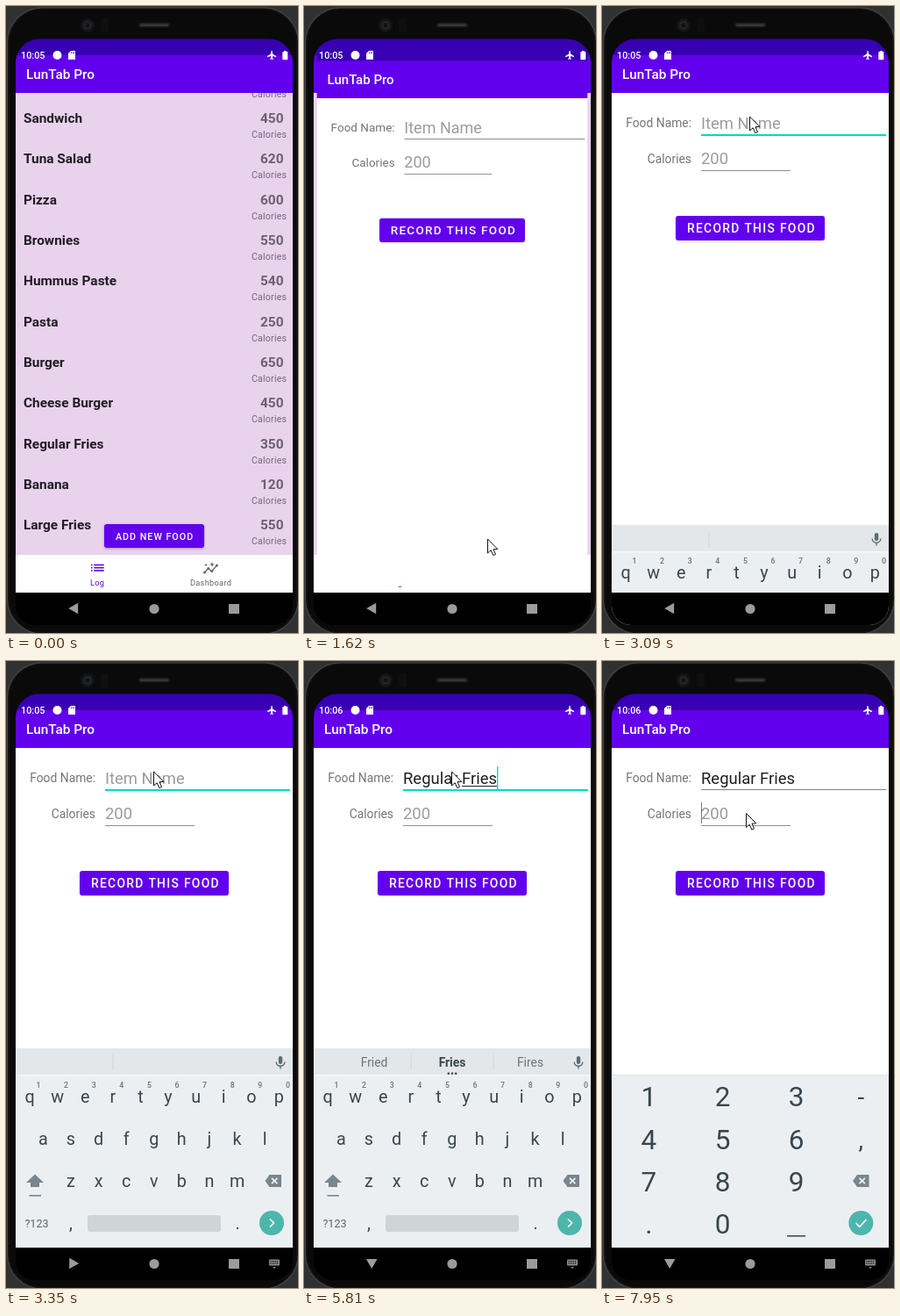
An HTML page with a canvas that plays this animation: 333 by 714 pixels, repeating every 8 s.

```html
<!DOCTYPE html>
<html lang="en">
<head>
<meta charset="utf-8">
<title>Food log</title>
<style>
html, body { margin: 0; width: 100%; height: 100%; overflow: hidden; background: #303133; }
canvas { display: block; width: 333px; height: 714px; }
</style>
</head>
<body>
<canvas id="stage"></canvas>
<script>
const W = 333, H = 714, LOOP = 8000;
const canvas = document.getElementById('stage');
const ctx = canvas.getContext('2d');
const dpr = window.devicePixelRatio || 1;
canvas.width = W * dpr;
canvas.height = H * dpr;

const PURPLE = '#6200ee', TEAL = '#03dac5', KEY = '#37474f', NAV = '#9b9b9b';
const FOODS = [['', ''], ['Sandwich', 450], ['Tuna Salad', 620], ['Pizza', 600], ['Brownies', 550],
  ['Hummus Paste', 540], ['Pasta', 250], ['Burger', 650], ['Cheese Burger', 450],
  ['Regular Fries', 350], ['Banana', 120], ['Large Fries', 550]];

// [time, typed text, suggestions]
const TYPING = [
  [4020, 'R', 'Really|R|Right'],
  [4160, 'Re', 'Really|Re|Red'],
  [4240, 'Reg', 'Regret|Reg|Register'],
  [4330, 'Regu', 'Regularly|Regular|Regulars'],
  [4410, 'Regul', 'Regularly|Regular|Regulars'],
  [4500, 'Regula', 'Regularly|Regular|Regulars'],
  [4580, 'Regular', 'Regularly|Regular|Regulars'],
  [4680, 'Regular ', 'Regularly|Regular|Regulars'],
  [4960, 'Regular F', 'For|F|From'],
  [5090, 'Regular Fr', 'From|Fr|Friday'],
  [5240, 'Regular Fri', 'Friday|Fri|Fries'],
  [5470, 'Regular Frie', 'Friend|Fries|Friends'],
  [5680, 'Regular Fries', 'Fried|Fries|Fires']
];

// [start, end, from x, from y, to x, to y]
const MOVES = [
  [260, 790, 259, 662, 209.5, 607],
  [1750, 2280, 209.5, 607, 207.5, 293],
  [2420, 2780, 207.5, 293, 168.5, 126],
  [6410, 6720, 168.5, 126, 164.5, 173.5]
];
const CLICKS = [[930, 1130], [2780, 2950], [6740, 6880]];
const CARETS = [[3380, 3880], [4020, 6010], [6470, 6740]];

const clamp = v => Math.max(0, Math.min(1, v));
const span = (t, a, b) => clamp((t - a) / (b - a));
const smooth = p => p * p * (3 - 2 * p);
const easeOut = p => 1 - (1 - p) ** 3;
const within = (t, list) => list.some(([a, b]) => t >= a && t < b);

function rect(x, y, w, h, color) {
  ctx.fillStyle = color;
  ctx.fillRect(x, y, w, h);
}

function round(x, y, w, h, r, color) {
  ctx.fillStyle = color;
  ctx.beginPath();
  ctx.roundRect(x, y, w, h, r);
  ctx.fill();
}

function disc(x, y, r, color) {
  ctx.fillStyle = color;
  ctx.beginPath();
  ctx.arc(x, y, r, 0, Math.PI * 2);
  ctx.fill();
}

function trace(points, closed) {
  ctx.beginPath();
  for (let i = 0; i < points.length; i += 2) ctx.lineTo(points[i], points[i + 1]);
  if (closed) ctx.closePath();
}

function poly(points, color) {
  ctx.fillStyle = color;
  trace(points, true);
  ctx.fill();
}

function line(points, color, width = 1) {
  ctx.strokeStyle = color;
  ctx.lineWidth = width;
  trace(points);
  ctx.stroke();
}

function text(str, x, y, size, color, { weight = 400, align = 'left', gap = 0 } = {}) {
  ctx.font = `${weight} ${size}px Roboto, sans-serif`;
  ctx.letterSpacing = `${gap}px`;
  ctx.textAlign = align;
  ctx.fillStyle = color;
  ctx.fillText(str, x, y);
  const width = ctx.measureText(str).width;
  ctx.letterSpacing = '0px';
  return width;
}

function button(x, y, w, h, shade) {
  ctx.save();
  ctx.shadowColor = `rgba(0,0,0,${shade})`;
  ctx.shadowBlur = 3 * dpr;
  ctx.shadowOffsetY = dpr;
  round(x, y, w, h, 3, PURPLE);
  ctx.restore();
}

function drawBody() {
  rect(0, 0, W, H, '#303133');
  round(1, 1.5, 333, 714, 40, '#48494b');
  round(2, 2.5, 331, 712, 39, '#131314');
  round(4, 4, 327, 709, 37, '#0a0a0b');
  disc(93, 22, 8, '#141517');
  disc(93, 22, 5, '#222428');
  disc(93, 22, 2.5, '#101215');
  round(108, 14, 9, 16, 2, '#0e0f10');
  round(151, 19, 36, 5.5, 2.7, '#1c1d1e');
  round(153, 20.5, 32, 2.5, 1.2, '#353637');
}

function drawHeader() {
  rect(11, 37, 316, 18.5, '#3700b3');
  rect(11, 55.5, 316, 43.5, PURPLE);
  text('LunTab Pro', 23, 83, 15.4, '#fff', { weight: 500 });
}

function drawStatus(t) {
  text(t < 5800 ? '10:05' : '10:06', 17, 60, 10.8, '#fff', { weight: 500 });
  disc(58.5, 56, 5, '#fff');
  poly([74, 51, 79, 51, 79, 61, 71, 61, 71, 54], '#fff');
  for (const x of [74, 75.8, 77.4]) rect(x, 52.3, 0.8, 2, PURPLE);
  poly([302.5, 51, 303.5, 51, 304, 54.5, 308, 57, 308, 58.2, 304, 57, 304, 59.5, 305, 60.5,
    305, 61, 303, 60.5, 301, 61, 301, 60.5, 302, 59.5, 302, 57, 298, 58.2, 298, 57, 302, 54.5], '#fff');
  rect(317, 51, 2.5, 1.5, '#fff');
  round(315.3, 52, 6, 9.2, 0.8, '#fff');
}

function drawList(t) {
  rect(11, 99, 316, 526, '#e8d2ec');
  ctx.save();
  ctx.beginPath();
  ctx.rect(11, 99, 316, 526);
  ctx.clip();
  FOODS.forEach(([name, kcal], i) => {
    const y = 86.6 + i * 46.35;
    text(name, 20, y, 15.4, '#211d22', { weight: 700 });
    text(kcal, 290, y, 15.4, '#6b616d', { weight: 700 });
    text('Calories', 280, y + 17, 10.5, '#736876', { gap: 0.25 });
  });
  ctx.restore();

  button(112, 590, 114, 27, 0.3);
  const ripple = span(t, 940, 1280);
  if (ripple > 0) {
    ctx.save();
    ctx.beginPath();
    ctx.roundRect(112, 590, 114, 27, 3);
    ctx.clip();
    disc(209, 607, 8 + 100 * easeOut(ripple), 'rgba(255,255,255,.12)');
    ctx.restore();
  }
  text('ADD NEW FOOD', 125, 607.5, 10.77, '#fff', { weight: 500, gap: 0.96 });

  rect(11, 625, 316, 43, '#fff');
  for (let i = 0; i < 3; i++) {
    const y = 635.7 + i * 3.2;
    rect(97, y, 1.6, 1.6, PURPLE);
    rect(100.2, y, 11.5, 1.6, PURPLE);
  }
  text('Log', 104.2, 660.3, 9.23, PURPLE, { align: 'center', gap: 0.3 });
  const grey = '#666';
  const dots = [226.5, 645, 230.8, 640.5, 234.8, 643.5, 240.5, 637];
  line(dots, grey, 1.3);
  for (let i = 0; i < 8; i += 2) disc(dots[i], dots[i + 1], 1.5, grey);
  poly([235, 633, 235.8, 635.2, 238, 636, 235.8, 636.8, 235, 639, 234.2, 636.8, 232, 636, 234.2, 635.2], grey);
  poly([228, 634.5, 228.5, 636, 230, 636.5, 228.5, 637, 228, 638.5, 227.5, 637, 226, 636.5, 227.5, 636], grey);
  text('Dashboard', 233.6, 660.3, 9.23, grey, { align: 'center', gap: 0.3 });
}

function drawForm(t) {
  rect(11, 99, 316, 569, '#fff');
  const label = '#757575', hint = '#9c9c9c', size = 18.46;
  const focused = t >= 2880 && t < 6930;
  text('Food Name:', 102, 138, 13.85, label, { align: 'right' });
  text('Calories', 102, 178.7, 13.85, label, { align: 'right' });

  const step = TYPING.filter(s => t >= s[0]).pop();
  let end = 113;
  if (step) {
    end += text(step[1], 113, 140, size, '#202020');
    const start = step[1].lastIndexOf(' ') + 1;
    if (focused && start < step[1].length) {
      const from = 113 + ctx.measureText(step[1].slice(0, start)).width;
      rect(from, 142, end - from, 1, '#202020');
    }
  } else {
    text('Item Name', 113, 140, size, hint);
  }
  text('200', 113, 180, size, hint);
  if (focused) rect(113, 146, 211, 2, TEAL);
  else rect(113, 146, 211, 1, '#858585');
  rect(113, 187, 102, 1, '#909090');

  if (focused && within(t, CARETS)) rect(Math.round(end), 120, 1.4, 26, TEAL);
  if (!focused && within(t, [[7000, 7470], [7950, 8000]])) rect(113, 161, 1, 24, '#777');

  button(84, 239, 170, 28, 0.12);
  text('RECORD THIS FOOD', 97, 258.2, 13.85, '#fff', { weight: 500, gap: 1.31 });
  return step;
}

function backspace(x, y) {
  poly([x - 9.5, y, x - 4.5, y - 7, x + 9, y - 7, x + 9, y + 7, x - 4.5, y + 7], '#78868d');
  line([x - 2, y - 3.2, x + 4.4, y + 3.2], '#eceff1', 1.7);
  line([x - 2, y + 3.2, x + 4.4, y - 3.2], '#eceff1', 1.7);
}

function mic(x, y) {
  const c = '#5b6b74';
  round(x - 2.2, y - 7, 4.4, 9, 2.2, c);
  ctx.strokeStyle = c;
  ctx.lineWidth = 1.4;
  ctx.beginPath();
  ctx.arc(x, y - 0.5, 4.8, 0, Math.PI);
  ctx.stroke();
  line([x, y + 4, x, y + 7.5], c, 1.4);
}

function drawLetters(words) {
  rect(11, 441, 316, 227, '#eceff1');
  rect(11, 441, 316, 30, '#e3e7ea');
  rect(11, 471, 316, 1.5, '#f6f8f9');
  rect(121.5, 448, 1, 18, '#cfd5d9');
  if (words) {
    rect(215.5, 448, 1, 18, '#cfd5d9');
    words.split('|').forEach((word, i) => {
      const mid = i === 1;
      text(word, 80 + 89 * i, 462.3, 13.85, mid ? KEY : '#66757d', { weight: mid ? 700 : 400, align: 'center' });
    });
    for (const x of [164.8, 169, 173.2]) disc(x, 469.8, 1.3, KEY);
  }
  mic(313, 457);

  const center = { align: 'center' };
  const rows = [['qwertyuiop', 27, 502.5], ['asdfghjkl', 42.3, 550.8], ['zxcvbnm', 74, 599]];
  for (const [keys, x, y] of rows) {
    [...keys].forEach((key, i) => text(key, x + i * 31.6, y, 19.8, KEY, center));
  }
  for (let i = 0; i < 10; i++) {
    text((i + 1) % 10, 37 + i * 31.6, 485.5, 8.8, '#66757d', { align: 'center', weight: 500 });
  }
  poly([33, 584.5, 43, 594, 38, 594, 38, 599, 28, 599, 28, 594, 23, 594], '#78868d');
  rect(26.5, 608, 13.5, 1.6, '#78868d');
  backspace(305, 592);

  text('?123', 35, 645, 12.6, '#56666e', center);
  text(',', 74, 647, 19.8, KEY, center);
  round(93, 631, 152, 19, 3, '#cfd4d7');
  text('.', 264, 647, 19.8, KEY, center);
  disc(303, 640, 14, '#4db6ac');
  line([301, 635.5, 305.5, 640, 301, 644.5], '#fff', 1.7);
}

function drawDigits() {
  rect(11, 471, 316, 197, '#eceff1');
  rect(11, 471, 316, 1, '#e0e5e8');
  const columns = [53.3, 137.7, 221.7];
  ['123', '456', '789', '.0_'].forEach((keys, row) => {
    [...keys].forEach((key, i) => {
      if (key === '_') rect(211, 654, 21, 1.5, KEY);
      else text(key, columns[i], 507.3 + row * 48.2, 31.5, KEY, { align: 'center' });
    });
  });
  text('-', 295.3, 506, 28, KEY, { align: 'center' });
  text(',', 295.3, 555, 28, KEY, { align: 'center' });
  backspace(295.5, 592);
  disc(295.3, 640, 14, '#4db6ac');
  line([289.5, 640, 293.8, 644.3, 301.5, 636], '#fff', 1.7);
}

function drawNav(t) {
  rect(11, 668, 316, 37, '#000');
  ctx.save();
  ctx.translate(77.2, 686);
  ctx.rotate(span(t, 3140, 3455) * Math.PI * 1.5);
  poly([-6, 0, 5, -6.3, 5, 6.3], NAV);
  ctx.restore();
  disc(169, 686.5, 5.6, NAV);
  rect(254, 681, 12, 11, NAV);
  if (t >= 3210) {
    round(300, 681.5, 12, 7, 1, '#8a8a8a');
    for (let i = 0; i < 4; i++) {
      rect(301.4 + i * 2.5, 683, 1.3, 1.2, '#000');
      rect(301.4 + i * 2.5, 685.3, 1.3, 1.2, '#000');
    }
    poly([304, 690, 308, 690, 306, 692], '#8a8a8a');
  }
}

function drawScreen(t) {
  ctx.save();
  ctx.beginPath();
  ctx.roundRect(11, 37.5, 316, 667.5, [27, 27, 22, 22]);
  ctx.clip();
  const open = span(t, 1470, 1800);
  if (open < 1) {
    drawHeader();
    drawList(t);
  }
  if (open > 0) {
    const scale = 0.85 + 0.15 * easeOut(open);
    ctx.save();
    ctx.globalAlpha = clamp(open * 3);
    ctx.translate(169, 352);
    ctx.scale(scale, scale);
    ctx.translate(-169, -352);
    drawHeader();
    const step = drawForm(t);
    ctx.restore();
    if (t >= 7000) {
      drawDigits();
    } else if (t >= 3090) {
      ctx.save();
      ctx.translate(0, 227 * (1 - easeOut(span(t, 3060, 3300))));
      drawLetters(step && step[2]);
      ctx.restore();
    }
  }
  drawStatus(t);
  drawNav(t);
  ctx.restore();
}

function drawPointer(t) {
  const move = MOVES.filter(m => t >= m[0]).pop();
  if (!move) return;
  const [a, b, x0, y0, x1, y1] = move;
  const p = smooth(span(t, a, b));
  const x = x0 + (x1 - x0) * p, y = y0 + (y1 - y0) * p;
  if (within(t, CLICKS)) disc(x, y, 15, 'rgba(255,246,80,.72)');
  ctx.save();
  ctx.translate(x, y);
  trace([0, 0, 0, 16, 3.7, 12.7, 6.3, 18.6, 9, 17.4, 6.5, 11.7, 11.3, 11.4], true);
  ctx.fillStyle = '#fff';
  ctx.fill();
  ctx.strokeStyle = '#111';
  ctx.lineWidth = 1;
  ctx.stroke();
  ctx.restore();
}

function draw(t) {
  ctx.setTransform(dpr, 0, 0, dpr, 0, 0);
  drawBody();
  drawScreen(t);
  drawPointer(t);
}

const begin = performance.now();
function tick() {
  draw((performance.now() - begin) % LOOP);
  requestAnimationFrame(tick);
}
tick();
</script>
</body>
</html>
```
